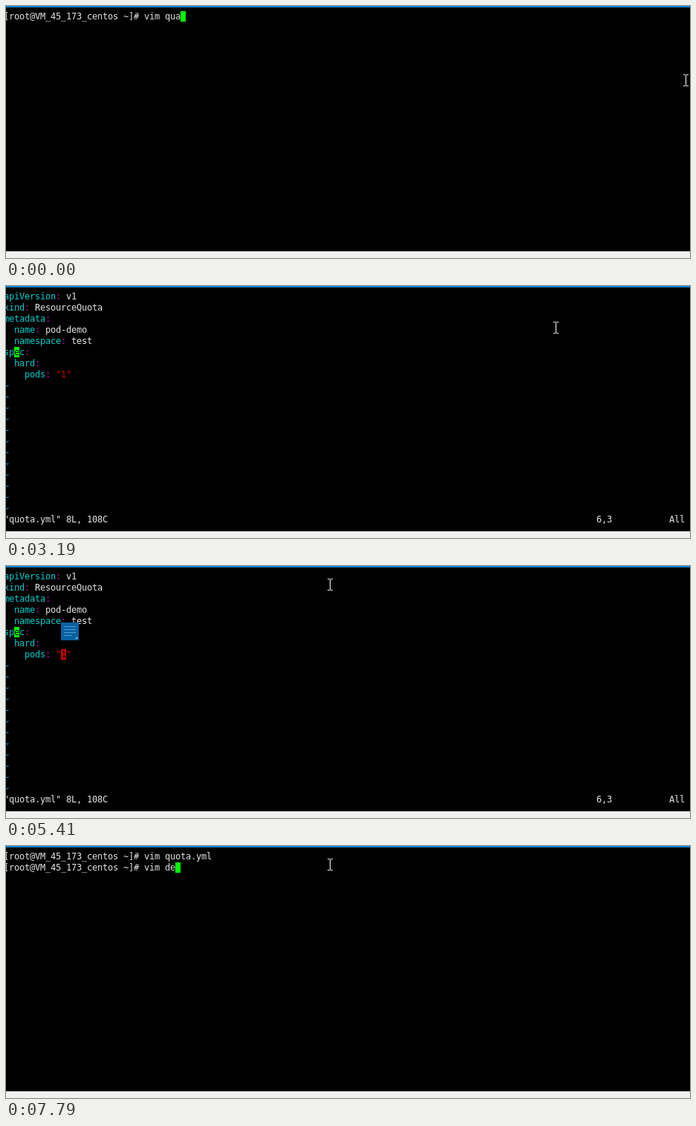
Write an HTML page with a canvas that moves like this. It is 921 px wide and 339 px high and loops after 8 s.

```html
<!DOCTYPE html>
<html lang="en">
<head>
<meta charset="utf-8">
<title>Editing quota.yml</title>
<style>
  html, body { margin: 0; width: 100%; height: 100%; overflow: hidden; background: #000; }
  canvas { display: block; }
</style>
</head>
<body>
<canvas id="stage" width="921" height="339"></canvas>
<script>
const ctx = document.getElementById('stage').getContext('2d', { alpha: false });
const LOOP = 8000, CELL = 7, LINE = 15, LEFT = -3, TOP = 7;
const WHITE = '#e5e5e5', KEY = '#00cdcd', COLON = '#cd00cd', RED = '#cd0000',
      TILDE = '#1e90d8', GREEN = '#00ff00';
const PROMPT = '[root@VM_45_173_centos ~]# ';
const YAML = [
  'apiVersion: v1', 'kind: ResourceQuota', 'metadata:', '  name: pod-demo',
  '  namespace: test', 'spec:', '  hard:', '    pods: "1"'
];

// Each list holds [start time, ...values]; the latest started entry applies.
const mouse = [
  [0, 915, 100], [3190, 740, 56], [3340, 600, 80], [3460, 330, 91], [3590, 190, 84],
  [3710, 122, 74], [3860, 105, 73], [4270, 100, 78], [4420, 90, 104], [4570, 86, 106],
  [4720, 79, 115], [4870, 79, 118], [5280, 190, 85], [5410, 436, 25]
];
const firstCommand = [[0, 'vim qua'], [680, 'vim qu'], [1100, 'vim quota.yml ']];
const secondCommand = [
  [6530, ''], [6960, 'v'], [7080, 'vi'], [7370, 'vim '], [7630, 'vim d'], [7790, 'vim de']
];
const editorRow = [[1650, 3], [2330, 4], [2480, 5]];

const at = (list, t) => list.findLast(entry => entry[0] <= t);
const within = (t, from, to) => t >= from && t < to;

function rect(color, x, y, w, h) {
  ctx.fillStyle = color;
  ctx.fillRect(x, y, w, h);
}

function text(str, col, row, color) {
  ctx.fillStyle = color;
  [...str].forEach((ch, i) =>
    ctx.fillText(ch, LEFT + (col + i) * CELL, TOP + row * LINE + 11));
}

function block(str, col, row, back, front) {
  rect(back, LEFT + col * CELL, TOP + row * LINE, str.length * CELL, 14);
  text(str, col, row, front);
}

const cursor = (col, row, ch = ' ') => block(ch, col, row, GREEN, '#000');

function shell(t) {
  const typed = PROMPT + at(firstCommand, t)[1];
  text(typed, 0, 0, WHITE);
  if (t >= 6530) {
    const next = PROMPT + at(secondCommand, t)[1];
    text(next, 0, 1, WHITE);
    cursor(next.length, 1);
  } else if (t >= 1500) {
    cursor(0, 1);
  } else {
    cursor(typed.length, 0);
  }
}

function editor(t) {
  YAML.forEach((line, row) => {
    const colon = line.indexOf(':'), value = line.slice(colon + 1);
    text(line.slice(0, colon), 0, row, KEY);
    text(':', colon, row, COLON);
    text(value, colon + 1, row, value.includes('"') ? RED : WHITE);
  });
  for (let row = 8; row < 20; row++) text('~', 0, row, TILDE);

  if (within(t, 4140, 4870)) block('test', 13, 4, WHITE, '#000');
  if (t >= 5150) block('1', 11, 7, RED, '#000');

  if (t >= 6120) {
    const command = t < 6240 ? ':' : ':q';
    text(command, 0, 20, WHITE);
    cursor(command.length, 20);
  } else {
    const row = at(editorRow, t)[1];
    cursor(2, row, YAML[row][2]);
    text('"quota.yml" 8L, 108C', 0, 20, WHITE);
    text(`${row + 1},3`, 114, 20, WHITE);
    text('All', 128, 20, WHITE);
  }
  if (within(t, 4270, 5000)) noteIcon(92, 91);
  if (t >= 5280) noteIcon(74, 76);
}

function noteIcon(x, y) {
  rect('#0a609f', x, y, 24, 24);
  [5, 9, 13, 17].forEach((dy, i) => rect('#4c9fd0', x + 4, y + dy, i < 3 ? 16 : 11, 1));
  ctx.fillStyle = '#8cc4e4';
  ctx.beginPath();
  ctx.moveTo(x + 22, y + 19);
  ctx.lineTo(x + 22, y + 22);
  ctx.lineTo(x + 19, y + 22);
  ctx.fill();
}

// The text pointer inverts what lies under it.
function pointer(x, y) {
  ctx.globalCompositeOperation = 'difference';
  for (const dy of [-8, 7]) {
    rect('#fff', x - 3, y + dy, 3, 1);
    rect('#fff', x + 1, y + dy, 3, 1);
  }
  rect('#fff', x, y - 7, 1, 14);
  ctx.globalCompositeOperation = 'source-over';
}

function draw(now) {
  const t = now % LOOP;
  rect('#000', 0, 0, 921, 339);
  ctx.font = '12px "DejaVu Sans Mono", monospace';
  (within(t, 1650, 6530) ? editor : shell)(t);
  rect('#0a84d6', 0, 0, 921, 2);
  rect('#f0f0f0', 0, 330, 921, 9);
  const [, x, y] = at(mouse, t);
  pointer(x, y);
}

const start = performance.now();
function tick() {
  draw(performance.now() - start);
  requestAnimationFrame(tick);
}
tick();
</script>
</body>
</html>
```
